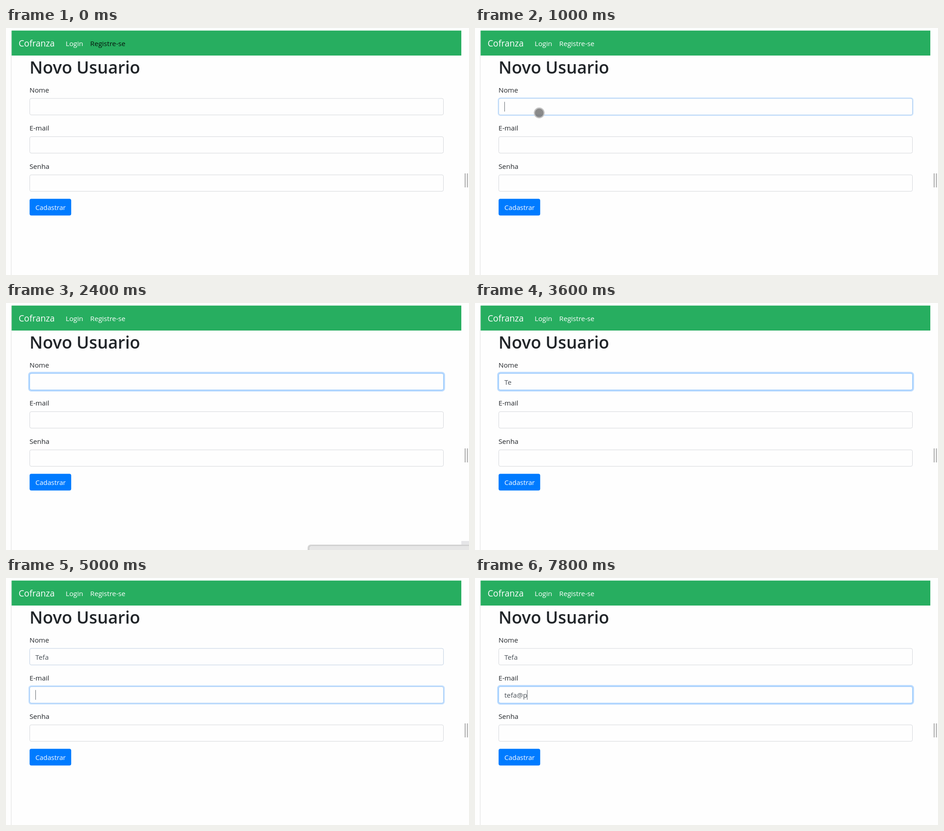
These frames come from a looping animation (1024 px wide and 547 px high, 8 s). An HTML page with a canvas:

```html
<!DOCTYPE html>
<html lang="pt-BR">
<head>
<meta charset="utf-8">
<title>Novo Usuario</title>
<style>
  html, body { margin: 0; width: 100%; height: 100%; overflow: hidden; background: #fefefe; }
  canvas { display: block; width: 1024px; height: 547px; }
</style>
</head>
<body>
<canvas id="stage" width="1024" height="547"></canvas>
<script>
const ctx = document.getElementById('stage').getContext('2d');
const LOOP = 8000, TICK = 100;
const BLINK = 480;          // half a caret cycle
const FADE = 140;           // focus ring transition
const FACE = '"Open Sans", "Noto Sans", sans-serif';
const PAPER = '#fefefe', INK = '#212529', BLUE = '#007bff';

// Moments of user input, in ms
const START = 300, CLICK = 920, TAB = 4760, LEAVE = 1200;
const name = { text: 'Tefa', keys: [2410, 3110, 3650, 3850] };
const mail = { text: 'tefa@p', keys: [5450, 5650, 5950, 6050, 7350, 7750] };
const inputs = [CLICK, ...name.keys, TAB, ...mail.keys];

const lerp = (a, b, p) => a + (b - a) * p;
const clamp = p => Math.min(1, Math.max(0, p));
const smooth = p => p * p * (3 - 2 * p);
const fade = (t, start) => smooth(clamp((t - start) / FADE));
const typed = (entry, t) => entry.text.slice(0, entry.keys.filter(k => k <= t).length);

// The caret restarts its blinking at every click or key press.
function caretOn(t) {
  const last = inputs.filter(k => k <= t).pop();
  return last !== undefined && (t - last) % (2 * BLINK) < BLINK;
}

// A curved sweep down the form and up to the first field, then away.
function pointerAt(t) {
  if (t < START || t >= LEAVE) return null;
  const u = clamp((t - START) / 700), v = clamp((t - 1000) / 100);
  const bend = (a, b, c) => lerp(lerp(a, b, u), lerp(b, c, u), u);
  return [lerp(bend(226, 200, 142), 233, v), lerp(bend(50, 683, 188), 312, v)];
}

function rect(x, y, w, h, color) {
  ctx.fillStyle = color;
  ctx.fillRect(x, y, w, h);
}

function box(x, y, w, h, r, fill, stroke) {
  ctx.beginPath();
  ctx.roundRect(x, y, w, h, r);
  ctx.fillStyle = fill;
  ctx.fill();
  if (!stroke) return;
  ctx.lineWidth = 1;
  ctx.strokeStyle = stroke;
  ctx.stroke();
}

function text(str, x, y, color = INK, size = 15.2, weight = 400) {
  ctx.font = `${weight} ${size}px ${FACE}`;
  ctx.fillStyle = color;
  ctx.fillText(str, x, y);
}

function field(label, y, focus = 0, value = '', caret = false) {
  const x = 52, w = 916, h = 37.5, s = 3 * focus;
  text(label, x, y - 13);
  if (focus) box(x - s, y - s, w + 2 * s, h + 2 * s, 4 + s, `rgba(0,123,255,${0.27 * focus})`);
  const edge = `rgb(${lerp(212, 134, focus)},${lerp(215, 190, focus)},${lerp(219, 252, focus)})`;
  box(x + 0.5, y + 0.5, w - 1, h - 1, 3.5, PAPER, edge);
  text(value, 65, y + 25.3, '#495057');
  if (caret) rect(65 + Math.round(ctx.measureText(value).width), y + 8, 1, 21.5, '#60666c');
}

function page(t) {
  rect(0, 0, 1024, 547, PAPER);
  rect(11, 6, 1, 541, '#dedede');
  rect(12.5, 5.7, 994.5, 55.3, '#27ae60');
  text('Cofranza', 28, 41, '#fff', 19.2);
  text('Login', 132, 39.5, '#fff');
  text('Registre-se', 186.3, 39.5, t < START ? '#06120b' : '#fff');
  text('Novo Usuario', 52, 101, INK, 37.4, 600);

  const caret = caretOn(t), moved = t >= TAB, shift = fade(t, TAB + 140);
  field('Nome', 155.5, fade(t, CLICK) * (1 - shift), typed(name, t), caret && !moved);
  field('E-mail', 240.1, shift, typed(mail, t), caret && moved);
  field('Senha', 324.7);

  box(52.2, 378.3, 92, 37, 4, BLUE);
  text('Cadastrar', 65, 403, '#fff', 14.8);
  for (const x of [1014.5, 1019.5]) rect(x, 322, 2, 31, '#a4a4a4');
}

function panel() {
  rect(1007, 527, 17, 9, '#e6e6e8');
  box(667, 535, 370, 30, 7, '#d6d6d6');
  box(670.5, 537.5, 370, 30, 5, '#e6e6e6', '#c9c9c9');
}

function dot(x, y) {
  ctx.beginPath();
  ctx.arc(x, y, 10.7, 0, Math.PI * 2);
  ctx.fillStyle = 'rgba(112,112,112,0.82)';
  ctx.fill();
  ctx.lineWidth = 2.4;
  ctx.strokeStyle = '#c2c2c2';
  ctx.stroke();
}

function draw(now) {
  const t = Math.floor((now % LOOP) / TICK) * TICK;
  page(t);
  if (t >= 2100 && t < 2500) panel();
  const spot = pointerAt(t);
  if (spot) dot(...spot);
  requestAnimationFrame(draw);
}
draw(performance.now());
</script>
</body>
</html>
```
